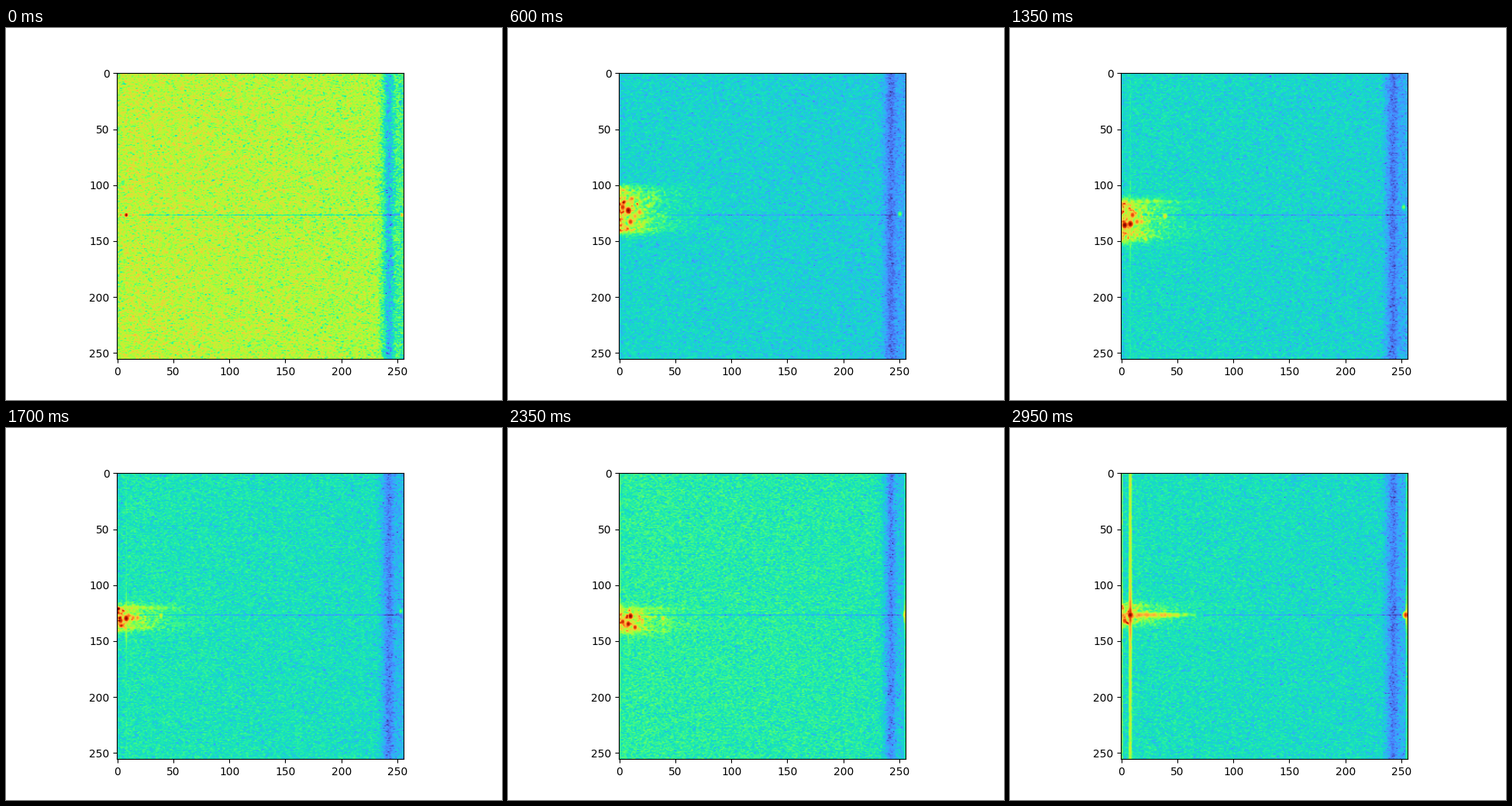
A matplotlib script that plays this animation: 640x480 px, repeating every 3000 ms.

```python
import numpy as np
import matplotlib.pyplot as plt
from matplotlib.animation import FuncAnimation

N = 256
FRAMES = 60
INTERVAL = 50
DC = 127  # zero-Doppler row

x = np.arange(N)[None, :]
y = np.arange(N)[:, None]

# Values of each track at KEYS, linear in between.
KEYS = [0, 6, 18, 27, 41, 47, 59]
TRACKS = {
    "base": [.52, .34, .24, .30, .35, .35, .315],
    "line": [0, .20, .20, .34, .36, .30, .56],
    "edge": [0, 0, 0, 0, 0, .42, .45],
    "streak_y": [127, 126, 128, 115, 126, 121, 127],
    "streak": [.40, .45, .42, .52, .60, .50, .72],
    "reach": [20, 45, 48, 66, 48, 64, 74],
    "top": [126, 93, 110, 113, 122, 121, 117],
    "bottom": [129, 138, 150, 151, 131, 143, 136],
    "cloud": [0, .72, .62, .66, .66, .70, .66],
    "echo_x": [254, 254, 247, 252, 254, 254, 254],
    "echo_y": [127, 127, 125, 120, 127, 127, 127],
    "echo": [.74, .46, .47, .47, .46, .45, .88],
}

# Range bin -> (Doppler row, level) of each scatterer.
SCATTERERS = {
    3: ([127, 109, 131, 136, 128, 133, 132],
        [.78, .94, .82, 1.0, .82, .90, .86]),
    8: ([127, 116, 130, 135, 125, 135, 127],
        [1.0, .97, 1.0, .98, 1.0, .96, 1.0]),
    10: ([127, 124, 142, 127, 128, 128, 128],
         [.50, .92, .78, .85, .70, 1.0, .75]),
    14: ([127, 131, 125, 133, 126, 138, 128],
         [.72, .72, .70, .78, .75, .88, .70]),
    18: ([127, 119, 130, 133, 126, 130, 127],
         [.50, .80, .68, .70, .78, .72, .70]),
    39: ([127, 128, 128, 128, 127, 130, 127],
         [.30, .45, .50, .62, .55, .65, .70]),
}


def sigmoid(v):
    return 1 / (1 + np.exp(-v))


def smooth(a, axis):
    return .5 * a + .25 * (np.roll(a, 1, axis) + np.roll(a, -1, axis))


# Receiver response over range, with the dip near the far end.
response = (1.04 - .07 * x / N
            - .12 * np.exp(-x / 2.5)
            - .22 * sigmoid((x - 235) / 1.5)
            - .27 * np.exp(-((x - 242.5) / 4) ** 2))
notch = np.where((y == DC) & (x > 18), .34, 0)


def spectrum(i):
    p = {k: np.interp(i, KEYS, v) for k, v in TRACKS.items()}
    rng = np.random.default_rng(100 + i)
    base = p["base"]
    sharp = base ** 2

    noise = rng.standard_normal((N, N))
    noise = noise + .45 * np.roll(noise, 1, 1)
    noise /= noise.std()
    noise -= .1 * (noise ** 2 - 1)
    grain = smooth(smooth(rng.standard_normal((N, N)), 0), 1)
    grain /= grain.std()

    img = base * (response - notch + .115 * noise)

    window = sigmoid((y - p["top"]) / 1.5) * sigmoid((p["bottom"] - y) / 1.5)
    lift = max(p["cloud"] - base, 0)
    img += lift * window * np.exp(-x / 22 + .35 * grain - .06)

    def blob(cx, cy, level):
        return level - sharp * ((x - cx) ** 2 / 2 + (y - cy) ** 2 / 3)

    layers = [blob(p["echo_x"], p["echo_y"], p["echo"])]
    for cx, (rows, levels) in SCATTERERS.items():
        layers.append(blob(cx, np.interp(i, KEYS, rows),
                           np.interp(i, KEYS, levels)))

    # Doppler sidelobes of the strongest scatterer and of the range edges.
    cy = np.interp(i, KEYS, SCATTERERS[8][0])
    layers.append(p["line"] + .35 * np.exp(-abs(y - cy) / 14)
                  - sharp * (x - 8) ** 2 / 1.2 + .02 * grain)
    rise = .3 * np.exp(-abs(y - DC) / 8)
    for cx, drop in ((.5, 0), (255, .05)):
        layers.append(p["edge"] - drop + rise
                      - sharp * (x - cx) ** 2 + .02 * grain)

    # Range streak.
    fall = (p["streak"] - base) * (x / p["reach"]) ** 2
    streak = (p["streak"] - fall + .04 * np.sin(.9 * x) + .03 * grain
              - sharp * (y - p["streak_y"]) ** 2 / 3)
    layers.append(np.where((x > 8) & (x < p["reach"]), streak, 0))

    for layer in layers:
        img = np.maximum(img, layer)
    return np.clip(img, 0, 1)


fig, ax = plt.subplots(figsize=(6.4, 4.8), dpi=100)
im = ax.imshow(spectrum(0), cmap="turbo", vmin=0, vmax=1)


def update(i):
    im.set_data(spectrum(i))
    return [im]


anim = FuncAnimation(fig, update, frames=FRAMES, interval=INTERVAL,
                     repeat=True, repeat_delay=0)
plt.show()
```
